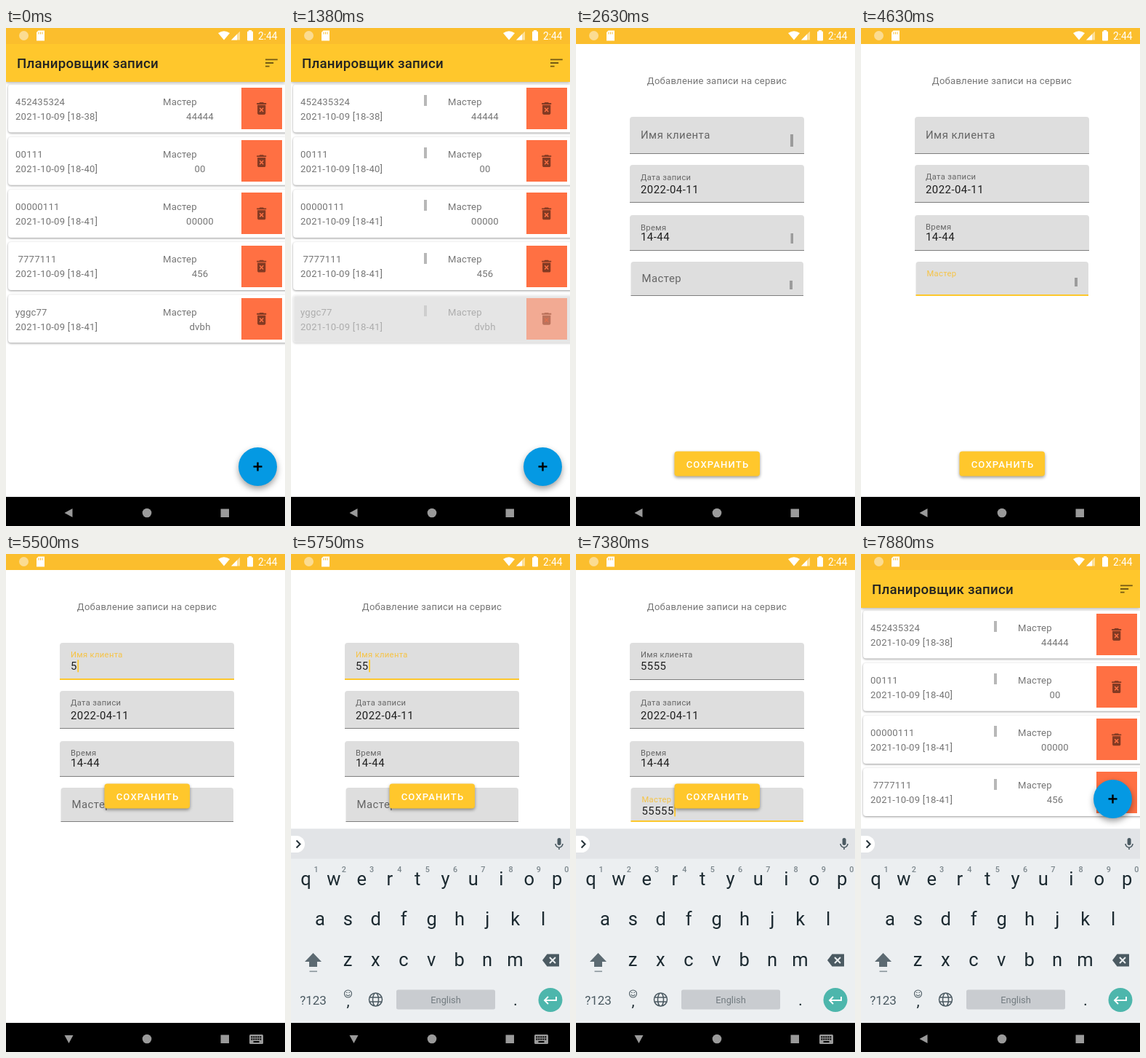
An HTML page with a canvas that plays this animation: 384 px wide and 684 px high, repeating every 8000 ms.

```html
<!DOCTYPE html>
<html lang="ru">
<head>
<meta charset="utf-8">
<style>
html, body { margin: 0; width: 100%; height: 100%; overflow: hidden; background: #fff; }
canvas { display: block; }
</style>
</head>
<body>
<canvas id="stage" width="384" height="684"></canvas>
<script>
const ctx = document.getElementById('stage').getContext('2d');
const LOOP = 8000, TICK = 125, LIFT = 266;
const YELLOW = '#ffc72c', GREY = '#757575', NAV = '#9a9a9a', INK = '#1c2a31', SLATE = '#4b5a62';

function text(str, x, y, size, color, o = {}) {
  ctx.font = `${o.weight || 400} ${size}px Roboto, sans-serif`;
  ctx.letterSpacing = (o.gap || 0) + 'px';
  ctx.textAlign = o.align || 'left';
  ctx.fillStyle = color;
  ctx.fillText(str, x, y);
}
function rect(x, y, w, h, color) {
  ctx.fillStyle = color;
  ctx.fillRect(x, y, w, h);
}
function round(x, y, w, h, r, color) {
  ctx.beginPath();
  ctx.roundRect(x, y, w, h, r);
  ctx.fillStyle = color;
  ctx.fill();
}
function disc(x, y, r, color) {
  ctx.beginPath();
  ctx.arc(x, y, r, 0, Math.PI * 2);
  ctx.fillStyle = color;
  ctx.fill();
}
function shadowed(color, blur, dy, draw) {
  ctx.save();
  ctx.shadowColor = color;
  ctx.shadowBlur = blur;
  ctx.shadowOffsetY = dy;
  draw();
  ctx.restore();
}
// SVG path placed at x, y; filled, or stroked when a width is given
function icon(d, x, y, scale, color, width) {
  ctx.save();
  ctx.translate(x, y);
  ctx.scale(scale, scale);
  const path = new Path2D(d);
  if (width) {
    ctx.strokeStyle = color;
    ctx.lineWidth = width;
    ctx.stroke(path);
  } else {
    ctx.fillStyle = color;
    ctx.fill(path);
  }
  ctx.restore();
}
function faded(alpha, draw) {
  ctx.save();
  ctx.globalAlpha *= Math.max(0, Math.min(1, alpha));
  draw();
  ctx.restore();
}

function statusBar() {
  rect(0, 0, 384, 22, '#fbbe2d');
  disc(24.5, 10.5, 6.5, '#fbdc92');
  icon('M-3 -7H5.5V7H-5.5V-4.5Z', 47.5, 10.5, 1, '#fff');
  icon('M-2.5 -5V-2M0 -5V-2M2.5 -5V-2', 47.5, 10.5, 1, '#fbbe2d', 1);
  icon('M0 6L-8 -3.5Q0 -9 8 -3.5Z', 300, 10.5, 1, '#fff');
  icon('M-6 6L6 -6V6Z', 316, 10.5, 1, '#fddf97');
  icon('M-6 6L2 -2V6Z', 316, 10.5, 1, '#fff');
  round(332, 4.5, 8, 13, 1, '#fff');
  rect(334, 3, 4, 2, '#fff');
  text('2:44', 347, 15.5, 13.8, '#fff');
}

function navBar(turn, typing) {
  rect(0, 644, 384, 40, '#000');
  ctx.save();
  ctx.translate(86.5, 666);
  ctx.rotate(-turn * Math.PI / 2);
  icon('M-6 0L5 -6V6Z', 0, 0, 1, NAV);
  ctx.restore();
  disc(194, 666, 6.3, NAV);
  rect(295.5, 660.5, 11.5, 11.5, NAV);
  if (!typing) return;
  round(335, 660, 19, 13, 1.5, NAV);
  for (let i = 0; i < 5; i++) {
    rect(337.3 + i * 3, 662.3, 2, 2, '#000');
    rect(337.3 + i * 3, 665.5, 2, 2, '#000');
  }
  rect(340.5, 669, 8, 2, '#000');
}

function trash(x, y) {
  const color = '#833a23';
  icon('M6 19c0 1.1.9 2 2 2h8c1.1 0 2-.9 2-2V7H6zM15.5 4l-1-1h-5l-1 1H5v2h14V4z', x - 11.2, y - 11.2, 0.933, color);
  icon('M9.3 11.2L14.7 16.8M14.7 11.2L9.3 16.8', x - 11.2, y - 11.2, 0.933, '#ff7043', 1.6);
}

const rows = [
  ['452435324', '18-38', '44444'],
  ['00111', '18-40', '00'],
  ['00000111', '18-41', '00000'],
  [' 7777111', '18-41', '456'],
  ['yggc77', '18-41', 'dvbh']
];
function card([name, time, master], i, bars) {
  const y = 77.5 + i * 72.2, gap = { gap: 0.23 };
  shadowed('rgba(0,0,0,.4)', 3, 1, () => round(3, y, 385, 66, 4, '#fff'));
  text(name, 13, y + 28.2, 13.07, GREY, gap);
  text(`2021-10-09 [${time}]`, 13, y + 48.2, 13.07, GREY, gap);
  text('Мастер', 216, y + 28.2, 13.07, GREY, gap);
  text(master, 267, y + 48.2, 13.07, GREY, { gap: 0.23, align: 'center' });
  if (bars) rect(183, Math.round(y + 14.5), 4, 15, '#b8b8b8');
  rect(324, Math.round(y + 4.5), 56, 57, '#ff7043');
  trash(351.7, y + 33);
}

function fab(y, pressed) {
  shadowed('rgba(0,0,0,.38)', pressed ? 11 : 8, pressed ? 5 : 4, () => disc(346.5, y, 26.5, '#0499e3'));
  if (pressed) disc(346.5, y, 26.5, 'rgba(0,0,0,.04)');
  rect(340.5, y - 1.3, 12, 2.4, '#000');
  rect(345.3, y - 6, 2.4, 12, '#000');
}

function listScreen(k, typing) {
  rect(0, 0, 384, 684, '#fff');
  const bars = k >= 11;
  rows.forEach((row, i) => {
    if (i < 4) card(row, i, bars);
    else if (k < 12) faded(k < 11 ? 1 : 0.5, () => card(row, i, bars));
  });
  shadowed('rgba(0,0,0,.35)', 4, 1, () => rect(0, 20, 384, 54, YELLOW));
  text('Планировщик записи', 15, 55, 18.67, '#222', { weight: 500, gap: 0.23 });
  icon('M3 18h6v-2H3zM3 6v2h18V6zM3 13h12v-2H3z', 354.2, 36.8, 0.933, 'rgba(0,0,0,.55)');
  fab(602.5 - (typing ? LIFT : 0), !typing && k >= 18);
}

// float: 0 puts the label in the field as a hint, 1 above the value
function field({ x, y, w, h, label, hintY, labelY, valueY, value = '', float = 1, focus, caret, bar = 0, barBox }) {
  round(x, y, w, h, [4, 4, 0, 0], '#dedede');
  rect(x, y + h - (focus ? 2 : 1), w, focus ? 2 : 1, focus ? YELLOW : '#7e7e7e');
  const size = 14.93 - 3.73 * float;
  const color = focus && float > 0 ? '#f6c344' : '#666';
  text(label, x + 15, hintY + (labelY - hintY) * float, size, color, { gap: size * 0.03125 });
  if (value) text(value, x + 15, valueY, 14.93, '#1e1e1e', { gap: 0.467 });
  if (caret) rect(x + 15.5 + value.length * 8.85, valueY - 14, 1.8, 17, YELLOW);
  if (bar > 0) faded(bar, () => rect(...barBox, '#9c9c9c'));
}

const ramp = (k, start) => k <= start ? 0 : k === start + 1 ? 0.7 : 1;
const typed = (k, ticks) => '5'.repeat(ticks.filter(t => k >= t).length);

function formScreen(k, typing) {
  rect(0, 0, 384, 684, '#fff');
  text('Добавление записи на сервис', 194, 77, 13.07, GREY, { gap: 0.23, align: 'center' });

  const settle = k === 21 ? 1.8 : 0;
  const intro = k < 24 ? 1 : 1 - (k - 23) / 6;
  const onName = k >= 39 && k < 51;
  const onMaster = (k >= 33 && k < 39) || k >= 51;
  const masterFloat = k < 39 ? ramp(k, 33) : k < 51 ? 1 - ramp(k, 39) : ramp(k, 51);

  field({
    x: 74, y: 122, w: 240, h: 51, label: 'Имя клиента', hintY: 152, labelY: 141.6, valueY: 159.3,
    value: typed(k, [43, 46, 47, 48]), float: ramp(k, 39), focus: onName, caret: onName && k >= 40,
    bar: k >= 39 ? (k < 43 && onName ? 1 : 0) : intro, barBox: [295, 146, 4, 17]
  });
  field({
    x: 74, y: 188, w: 240, h: 52, label: 'Дата записи', labelY: 207.6 + settle, hintY: 219,
    valueY: 226.7, value: '2022-04-11'
  });
  field({
    x: 74, y: 257, w: 240, h: 49, label: 'Время', labelY: 276.6 + settle, hintY: 287,
    valueY: 292, value: '14-44', bar: intro, barBox: [295.5, 282, 3.5, 14]
  });
  field({
    x: 75.5, y: 321, w: 237.5, h: 47, label: 'Мастер', hintY: 349.3, labelY: 341, valueY: 357.5,
    value: typed(k, [53, 55, 57, 58, 59]), float: masterFloat, focus: onMaster,
    caret: onMaster && k !== 37 && k !== 38,
    bar: onMaster ? (k < 54 ? 1 : k === 54 ? 0.5 : 0) : intro, barBox: [294, k < 24 ? 347 : 343, 4, 12]
  });

  const top = 581.5 - (typing ? LIFT : 0);
  shadowed('rgba(0,0,0,.4)', 4, 2, () => round(135.5, top, 117.5, 34, 4, YELLOW));
  text('СОХРАНИТЬ', 195, top + 22.2, 13.07, '#fff', { weight: 500, gap: 1.17, align: 'center' });
}

function keyboard() {
  const center = { align: 'center' };
  rect(0, 377.5, 384, 266.5, '#eceff1');
  rect(0, 377.5, 384, 41, '#e2e4e7');
  round(-12, 387, 31, 23, 11.5, '#fff');
  icon('M-2.5 -5L2.5 0L-2.5 5', 10, 398.5, 1, '#26333a', 2);
  round(366.6, 390, 5, 10, 2.5, SLATE);
  icon('M-5 0A5 5 0 0 0 5 0M0 5V8', 369, 398, 1, SLATE, 1.6);

  [['qwertyuiop', 20.5, 455], ['asdfghjkl', 40, 510], ['zxcvbnm', 78, 566]].forEach(([keys, x, y]) => {
    [...keys].forEach((c, i) => text(c, x + i * 38.4, y, 25.5, INK, center));
  });
  [...'1234567890'].forEach((c, i) => text(c, 34.5 + i * 38.3, 436.5, 10.8, '#7b868c', { align: 'center', weight: 500 }));

  icon('M0 -10L11.5 2H5.5V9H-5.5V2H-11.5Z', 30.5, 558, 1, '#5c6a72');
  rect(25.5, 572.5, 10.5, 1.6, '#8a959b');
  icon('M-12 0L-5.5 -8.5H11V8.5H-5.5Z', 358, 558, 1, SLATE);
  icon('M-2 -4L6 4M6 -4L-2 4', 358, 558, 1, '#eceff1', 2);

  text('?123', 30.5, 618.5, 17, SLATE, center);
  icon('M5 0A5 5 0 1 1 -5 0A5 5 0 1 1 5 0M-2.8 1.2Q0 4.2 2.8 1.2M-2.4 -1.6H-1M1 -1.6H2.4', 78.5, 604, 1, SLATE, 1.1);
  text(',', 78.5, 621, 21, INK, center);
  icon('M9 0A9 9 0 1 1 -9 0A9 9 0 1 1 9 0M4 0A4 9 0 1 1 -4 0A4 9 0 1 1 4 0M-8.5 -3H8.5M-8.5 3H8.5', 116.5, 612, 1, SLATE, 1.5);
  round(145, 598.5, 136, 27, 2.5, '#c9ccd0');
  text('English', 213, 617, 12.8, '#737c81', center);
  text('.', 309, 620, 22, INK, center);
  disc(357, 612.5, 16.5, '#4db6ac');
  icon('M8 -4V1H-7M-3 -4L-8 1L-3 6', 357, 612, 1, '#fff', 1.9);
}

function draw(ms) {
  const k = Math.floor(Math.floor(ms / 10) * 10 / TICK);
  const form = k >= 21 && k < 62;
  const typing = k >= 40;
  if (form) formScreen(k, typing);
  else listScreen(k, typing);
  if (k >= 46) keyboard();
  statusBar();
  navBar(form ? Math.max(0, Math.min(1, (k - 39) / 4)) : 0, form && typing);
}

const start = performance.now();
function loop() {
  draw((performance.now() - start) % LOOP);
  requestAnimationFrame(loop);
}
loop();
</script>
</body>
</html>
```
